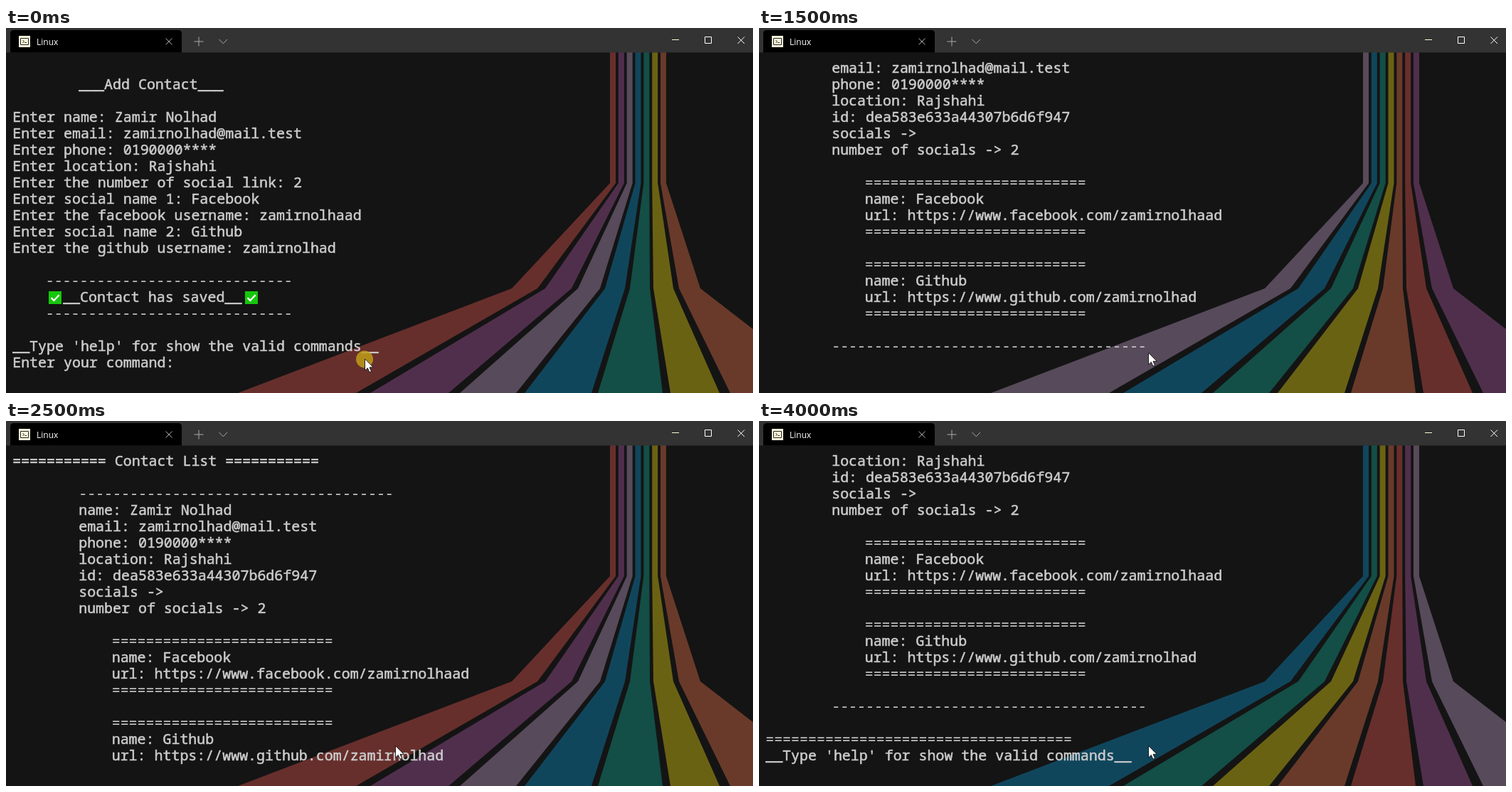
Recreate the animation shown at these times as an HTML page. Size 1050 px wide and 513 px high, loop 4.5 s.

```html
<!DOCTYPE html>
<html lang="en">
<head>
<meta charset="utf-8">
<title>Terminal</title>
<style>
  html, body { margin: 0; width: 100%; height: 100%; overflow: hidden; background: #141414; }
  svg { display: block; width: 100%; height: 100%; }
  #rows { font: 19.95px "Noto Sans Mono", monospace; fill: #ccc; font-variant-ligatures: none; }
  .words { stroke: #ccc; stroke-width: .55; }
  .tab { font: 12px "Open Sans", "Noto Sans", sans-serif; fill: #fff; }
  .line { fill: none; stroke-width: 1; }
</style>
</head>
<body>
<svg viewBox="0 0 1050 513" xmlns="http://www.w3.org/2000/svg">
  <rect width="1050" height="513" fill="#141414"/>
  <g id="stripes"></g>
  <g id="rows"></g>
  <rect id="caret" width="1" height="22" fill="#ccc"/>
  <circle id="click" cx="504" cy="465.5" r="12" fill="#c09c18" fill-opacity=".85"/>
  <path id="mouse" d="M0 0V16.5L3.8 12.9L6.4 18.8L9 17.6L6.5 11.9H11.7Z" fill="#fff" stroke="#111" stroke-width=".9"/>

  <rect width="1050" height="34.5" fill="#333"/>
  <path d="M6 34.5V8Q6 3 11 3H242Q247 3 247 8V34.5Z" fill="#000"/>
  <rect x="18" y="11" width="16" height="16" fill="#fff8dc"/>
  <path class="line" d="M20.5 14.5H31.5V23.5H20.5ZM23.5 17L25.5 19L23.5 21M26.5 20.5H29" stroke="#222"/>
  <text class="tab" x="43" y="24">Linux</text>
  <path class="line" d="M224.5 14.5L233.5 23.5M233.5 14.5L224.5 23.5" stroke="#aaa"/>
  <path class="line" d="M264.5 19H277.5M271 12.5V25.5M299.5 16L305.3 21.8L311 16" stroke="#aaa"/>
  <path class="line" d="M936 16.5H946" stroke="#fff8dc"/>
  <path class="line" d="M982.5 12.5H991.5V21.5H982.5Z" stroke="#fff"/>
  <path class="line" d="M1028.5 12.5L1038 22M1038 12.5L1028.5 22" stroke="#fff"/>
</svg>
<script>
const $ = id => document.getElementById(id);
const ADVANCE = 11.97, LINE = 23, VISIBLE = 19, STEP = 500, LOOP = 4500;
const colors = ["#672f2c", "#502f4c", "#574a5a", "#10465c", "#134f46", "#6a6213", "#693a2a"];

// knee left, knee right, bottom left, bottom right
const bands = [
  [711, 747, 326, 492], [758, 795, 512, 622], [804, 835, 638, 717], [842, 870, 729, 823],
  [877, 905, 832, 923], [910, 938, 934, 1003], [946, 976, 1018, 1166]
];
const bandPath = ([kl, kr, bl, br], i) => {
  const l = 849 + i * 11.83, r = l + 8;
  return `M${l} 34V218L${kl} 366L${bl} 513H${br}L${kr} 366L${r} 218V34Z`;
};
$("stripes").innerHTML = bands.map((b, i) => `<path d="${bandPath(b, i)}"/>`).join("");
const stripes = [...$("stripes").children];

const user = "zamirnolhad", page = "zamirnolhaad";
const person = "Zamir Nolhad", mail = user + "@mail.test", phone = "0190000****";
const hint = "__Type 'help' for show the valid commands__";
const blank = [0, ""];
const rule = (tabs, mark, n) => [tabs, mark.repeat(n)];
const social = (name, url) => [
  rule(3, "=", 26), [3, "name: " + name], [3, "url: https://www." + url], rule(3, "=", 26), blank
];

const form = [
  blank, [2, "___Add Contact___"], blank,
  [0, "Enter name: " + person],
  [0, "Enter email: " + mail],
  [0, "Enter phone: " + phone],
  [0, "Enter location: Rajshahi"],
  [0, "Enter the number of social link: 2"],
  [0, "Enter social name 1: Facebook"],
  [0, "Enter the facebook username: " + page],
  [0, "Enter social name 2: Github"],
  [0, "Enter the github username: " + user],
  blank, rule(1, "-", 29), [1, "__Contact has saved__", true], rule(1, "-", 29), blank,
  [0, hint], [0, "Enter your command: "]
];
const typed = [...form.slice(0, -1), [0, "Enter your command: show"]];
const list = [
  [0, "=========== Contact List ==========="], blank, rule(2, "-", 37),
  [2, "name: " + person],
  [2, "email: " + mail],
  [2, "phone: " + phone],
  [2, "location: Rajshahi"],
  [2, "id: dea583e633a44307b6d6f947"],
  [2, "socials ->"],
  [2, "number of socials -> 2"], blank,
  ...social("Facebook", "facebook.com/" + page),
  ...social("Github", "github.com/" + user),
  rule(2, "-", 37), blank, rule(0, "=", 36), [0, hint]
];

const rest = [547.5, 456.5];
const steps = [
  { text: form, top: 0, shift: 0, mouse: [504.5, 465], click: true },
  { text: typed, top: 0, shift: 5, caret: 297 },
  { text: typed, top: 1, shift: 4, caret: 9 },
  { text: list, top: 4, shift: 2, mouse: rest },
  { text: list, top: 0, shift: 1, mouse: rest },
  { text: list, top: 0, shift: 0, mouse: rest },
  { text: list, top: 3, shift: 4, mouse: rest },
  { text: list, top: 6, shift: 4, mouse: rest },
  { text: list, top: 6, shift: 3, mouse: rest }
];

const check = (x, y) =>
  `<g transform="translate(${x} ${y})"><rect width="18" height="18" fill="#16c60c"/>` +
  `<path d="M3.6 9.3L7.3 13L14.6 5.2" fill="none" stroke="#fff" stroke-width="2.3"/></g>`;

function row([tabs, text, checked], i) {
  const y = 63 + i * LINE, left = 9.2 + tabs * 46.5;
  const x = checked ? left + 2 * ADVANCE + .5 : left;
  const marks = checked ? check(60, y - 15) + check(336, y - 15) : "";
  const style = /\w/.test(text) ? ' class="words"' : "";
  return `<text x="${x}" y="${y}"${style}>${text}</text>${marks}`;
}

const show = (el, on) => el.setAttribute("visibility", on ? "visible" : "hidden");

function draw({ text, top, shift, mouse, click, caret }) {
  stripes.forEach((s, i) => s.setAttribute("fill", colors[(i + shift) % colors.length]));
  $("rows").innerHTML = text.slice(top, top + VISIBLE).map(row).join("");
  show($("mouse"), mouse);
  show($("click"), click);
  show($("caret"), caret);
  if (mouse) $("mouse").setAttribute("transform", `translate(${mouse})`);
  if (caret) {
    $("caret").setAttribute("x", caret);
    $("caret").setAttribute("y", 460);
  }
}

let current = -1;
function tick() {
  const next = Math.floor(performance.now() % LOOP / STEP);
  if (next !== current) draw(steps[current = next]);
  requestAnimationFrame(tick);
}
tick();
</script>
</body>
</html>
```
